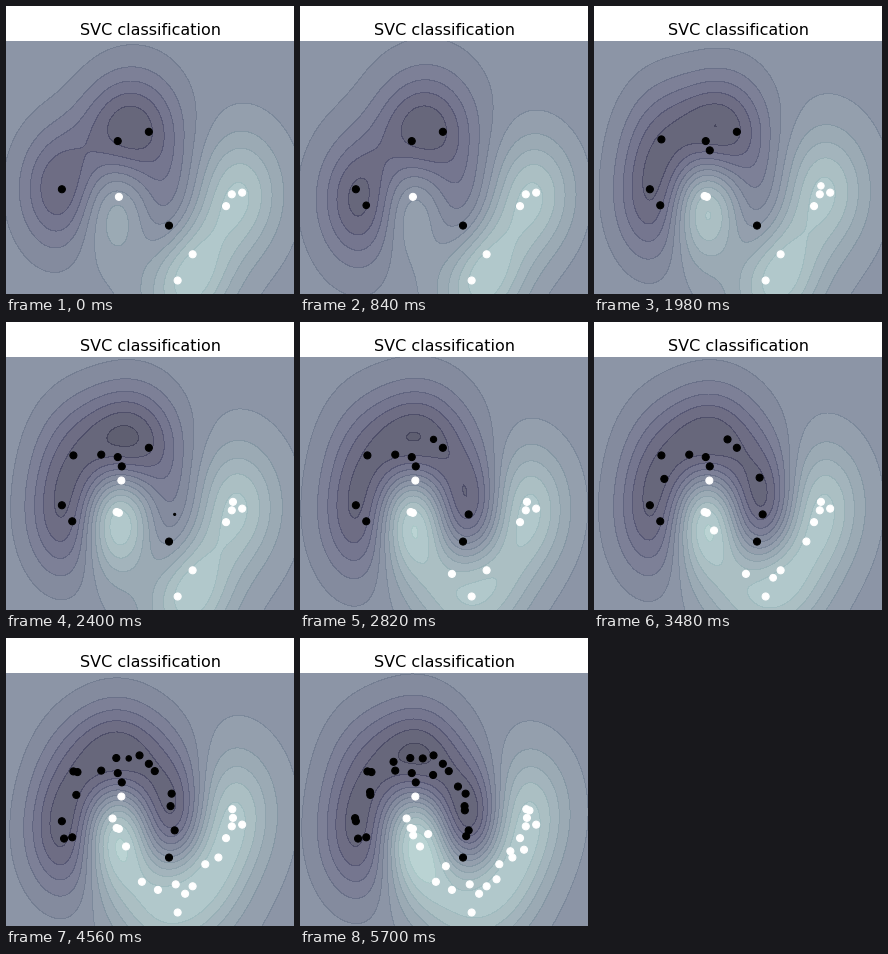
Write a matplotlib script that moves like this. It is 288 px wide and 288 px high and loops after 6.3 s.

```python
import numpy as np
import matplotlib.pyplot as plt
from matplotlib.animation import FuncAnimation

STEP_MS, MOVING, TOTAL = 60, 95, 105
START, COUNT = 10, 50           # samples at the beginning and at the end
GAMMA, C = 2.0, 1.0
XLIM, YLIM = (-2, 3), (-1, 2)
LEVELS = np.linspace(-2, 2, 20)
GOLDEN = (3 - 5 ** 0.5) / 2

plt.rcParams["font.family"] = "DejaVu Sans"

# The earliest samples shape the first boundary: "k" black, "w" white.
EARLY = [
    (-1.03, 0.24), (-0.06, 0.81), (0.48, 0.92), (0.83, -0.19),
    (-0.04, 0.15), (1.92, 0.18), (2.10, 0.20), (1.82, 0.04),
    (1.24, -0.53), (0.98, -0.84), (-0.85, 0.05), (-0.83, 0.83),
    (-0.08, 0.16), (0.01, 0.70), (1.94, 0.28),
]
EARLY_CLASSES = "kkkkwwwwwwkkwkw"


def moon(kind, turn):
    """Point on the upper (black) or lower (white) half circle."""
    a = np.pi * turn
    if kind == "k":
        return np.cos(a), np.sin(a)
    return 1 - np.cos(a), 0.5 - np.sin(a)


def make_samples():
    """Early samples, then both moons filled in turn by golden steps."""
    rng = np.random.RandomState(7)
    points, classes = list(EARLY), EARLY_CLASSES
    for i in range(COUNT - len(EARLY)):
        kind, first = (("k", 0.66), ("w", 0.0))[i % 2]
        turn = (first + i // 2 * GOLDEN) % 1
        points.append(moon(kind, turn) + rng.normal(0, 0.08, 2))
        classes += kind
    return np.array(points), classes


def rbf(a, b):
    d2 = ((a[:, None, :] - b[None, :, :]) ** 2).sum(axis=2)
    return np.exp(-GAMMA * d2)


POINTS, CLASSES = make_samples()
LABELS = np.array([-1.0 if c == "k" else 1.0 for c in CLASSES])
GRAM = rbf(POINTS, POINTS)
GX, GY = np.meshgrid(np.linspace(*XLIM, 110), np.linspace(*YLIM, 110))
GRID_K = rbf(np.column_stack([GX.ravel(), GY.ravel()]), POINTS)


def fit_svc(weights, tol=1e-3, max_iter=5000):
    """Weighted soft-margin SVC by SMO: signed multipliers and intercept."""
    n = len(weights)
    y, k, cap = LABELS[:n], GRAM[:n, :n], C * weights
    alpha, grad = np.zeros(n), -np.ones(n)
    eps = 1e-9
    for _ in range(max_iter):
        below, above = alpha < cap - eps, alpha > eps
        score = -y * grad
        up = np.where(np.where(y > 0, below, above), score, -np.inf)
        low = np.where(np.where(y > 0, above, below), score, np.inf)
        i, j = up.argmax(), low.argmin()
        gap = up[i] - low[j]
        if gap < tol:
            break
        room_i = cap[i] - alpha[i] if y[i] > 0 else alpha[i]
        room_j = alpha[j] if y[j] > 0 else cap[j] - alpha[j]
        curve = max(k[i, i] + k[j, j] - 2 * k[i, j], 1e-9)
        step = min(gap / curve, room_i, room_j)
        alpha[i] += y[i] * step
        alpha[j] -= y[j] * step
        grad += step * y * (k[:, i] - k[:, j])
    return alpha * y, (up[i] + low[j]) / 2


def sample_weights(frame):
    """Samples arrive ever faster; the newest one fades in."""
    t = min(frame / MOVING, 1)
    shown = START + (COUNT - START) * t ** 2
    w = np.clip(shown - np.arange(COUNT), 0, 1)
    return w[w > 1e-6]


fig = plt.figure(figsize=(4, 4), dpi=72, facecolor="white")
ax = fig.add_axes([0, 0, 1, 0.88])


def draw(frame):
    w = sample_weights(frame)
    n = len(w)
    coef, bias = fit_svc(w)
    field = (GRID_K[:, :n] @ coef + bias).reshape(GX.shape)

    ax.clear()
    ax.set_axis_off()
    # Translucent bands overlap slightly, which leaves fine outlines.
    ax.contourf(GX, GY, field, levels=LEVELS, cmap="bone", alpha=0.8,
                vmin=-2.5, vmax=2.5)
    ax.scatter(POINTS[:n, 0], POINTS[:n, 1], s=50 * w,
               c=list(CLASSES[:n]), zorder=3)
    ax.set_xlim(XLIM)
    ax.set_ylim(YLIM)
    ax.set_title("SVC classification", fontsize=16)
    return []


anim = FuncAnimation(fig, draw, frames=TOTAL, interval=STEP_MS,
                     init_func=lambda: [], repeat=True, repeat_delay=0)
plt.show()
```
